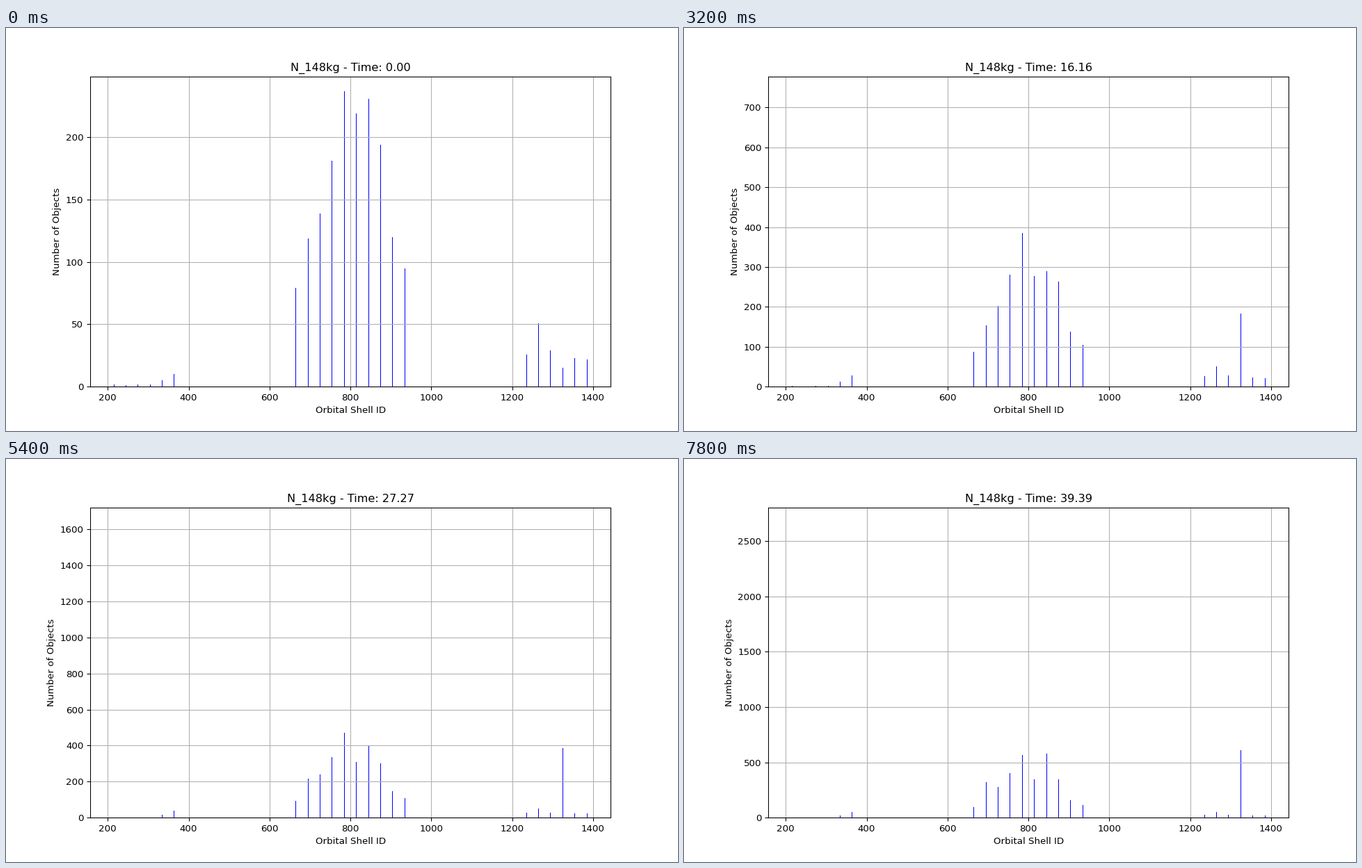
Recreate the animation shown at these times as a matplotlib script. Size 966 by 580 pixels, loop 8 s.

```python
import numpy as np
import matplotlib.pyplot as plt
from matplotlib.animation import FuncAnimation

STEPS = 40
INTERVAL = 200
k = np.arange(STEPS)
u = k / (STEPS - 1)

# Growth curves, each from 0 to 1 over the loop
KNOTS = [0, 5, 10, 16, 23, 30, 39]
steady = np.interp(k, KNOTS, [0, 0.185, 0.3, 0.45, 0.61, 0.78, 1])
rising = u ** 2
onset = np.logaddexp(0, (k - 6.9) / 2.3)
onset /= onset[-1]
curves = {695: rising, 845: rising, 1325: onset}

# Three groups of shells: first shell, populations at the start and at the end
groups = [
    (215, [2, 1, 2, 2, 5, 10],
          [2, 1, 2, 2, 21, 51]),
    (665, [79, 119, 139, 181, 237, 219, 231, 194, 120, 95],
          [98, 323, 280, 402, 566, 348, 579, 348, 159, 116]),
    (1235, [26, 51, 29, 13, 23, 22],
           [26, 51, 29, 612, 23, 22]),
]
shells, heights = [], []
for first, start, end in groups:
    for i, (a, b) in enumerate(zip(start, end)):
        shell = first + 30 * i
        shells.append(shell)
        heights.append(a + (b - a) * curves.get(shell, steady))
shells, heights = np.array(shells), np.array(heights)

# The fullest shell is too thin to be drawn but still drives the y range
unseen = np.interp(k, KNOTS, [0, 60, 285, 741, 1301, 1893, 2670])
top = 1.05 * np.maximum(heights.max(axis=0), unseen)

# Bars sit on a 775 column raster across the axes
span = shells[-1] - shells[0] + 0.8
left, right = shells[0] - 0.4 - 0.05 * span, shells[-1] + 0.4 + 0.05 * span
column = (right - left) / 775
centres = left + (np.floor((shells - left) / column) + 0.5) * column
pixel = (right - left) / (0.775 * 966)

fig, ax = plt.subplots(figsize=(10, 6.0042), dpi=96.6)
bars = ax.bar(centres, heights[:, 0], width=pixel, color="blue")
ax.set_xlim(left, right)
ax.set_xlabel("Orbital Shell ID")
ax.set_ylabel("Number of Objects")
title = ax.set_title("")
ax.grid(True)


def draw(step):
    for bar, height in zip(bars, heights[:, step]):
        bar.set_height(height)
    ax.set_ylim(0, top[step])
    title.set_text(f"N_148kg - Time: {step * 100 / 99:.2f}")
    return [*bars, title]


anim = FuncAnimation(fig, draw, frames=STEPS, interval=INTERVAL,
                     init_func=lambda: draw(0), repeat=True, repeat_delay=0)
plt.show()
```
